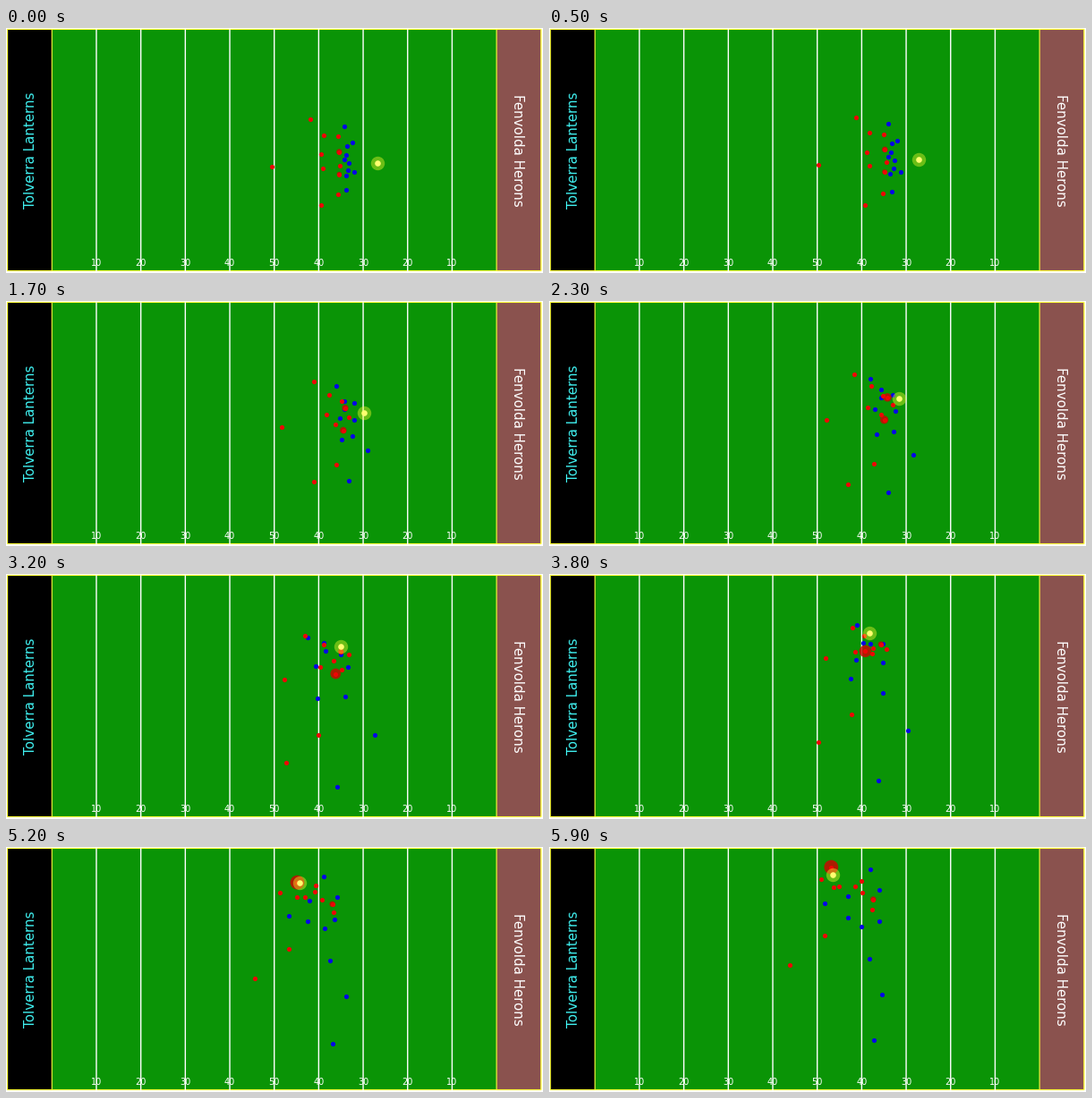
A matplotlib script for the animation above (6 s loop, 600 px wide and 274 px high).

```python
import numpy as np
import matplotlib.pyplot as plt
from matplotlib.animation import FuncAnimation
from matplotlib.patches import Rectangle

W, H, DPI = 600, 274, 100
FRAMES, INTERVAL = 60, 100
PT = 72 / DPI
GREEN, YELLOW = "#0a9406", "#ffff3c"
RED, DARK_RED, BLUE = "#ee0505", "#d40000", "#0505e6"

plt.rcParams["font.family"] = "DejaVu Sans"

# The field is cut into two phases: the rush, then the chase.
TURN, LAST = 32, FRAMES - 1
CHARGE = 6     # forward push of both teams during the rush, in pixels


def route(start, turn, end, charge=CHARGE):
    """Run from start to turn with ease-in, then on to end with ease-out."""
    start, turn, end = map(np.array, (start, turn, end))
    n = np.arange(FRAMES)[:, None]
    u = np.clip(n / TURN, 0, 1)
    v = np.clip((n - TURN) / (LAST - TURN), 0, 1)
    path = start + (turn - start) * u**1.6 + (end - turn) * v * (1.35 - 0.35 * v)
    push = charge * np.sin(np.pi * u) * [1, 0]
    return path + push + [0.3, -0.5]


def team(*routes):
    """Positions with shape (frame, player, 2)."""
    return np.stack([route(*r) for r in routes], axis=1)


ball = team(((414.5, 151), (373.5, 81), (316.5, 31), 0))

tackler = (372, 164), (368, 112), (315, 23)
helper = (372, 139), (374, 87), (362, 59)
red = team(
    tackler,
    helper,
    ((340, 102), (334, 69), (349, 38)),
    ((297, 155), (311, 118), (304, 36)),
    ((352, 198), (313, 211), (269, 132)),
    ((371, 186), (349, 180), (308, 99)),
    ((355, 120), (355, 79), (342, 44)),
    ((371, 121), (366, 97), (350, 51)),
    ((352, 141), (351, 104), (318, 45)),
    ((354, 157), (375, 107), (324, 44)),
    ((373, 154), (383, 90), (361, 70)),
)
blue = team(
    ((380, 181), (370, 238), (363, 216)),
    ((389, 161), (412, 180), (372, 165)),
    ((378, 110), (337, 71), (359, 25)),
    ((387, 128), (374, 90), (369, 48)),
    ((381, 132), (355, 77), (369, 83)),
    ((380, 142), (357, 86), (334, 55)),
    ((378, 147), (346, 103), (334, 79)),
    ((383, 151), (382, 104), (349, 89)),
    ((382, 159), (379, 137), (358, 125)),
    ((380, 165), (348, 139), (308, 63)),
)


def area(radius):
    return (2 * np.asarray(radius) * PT) ** 2


def halo_areas(n):
    """The tackler's halo swells as he closes in; the helper's flares once."""
    swell = np.interp(n, [10, 46], [2.7, 7.9])
    flare = 3.2 + 1.5 * np.exp(-(((n - 23) / 5) ** 2))
    return area([swell, flare])


fig = plt.figure(figsize=(W / DPI, H / DPI), dpi=DPI, facecolor="white")
ax = fig.add_axes([0, 0, 1, 1])
ax.set_xlim(0, W)
ax.set_ylim(H, 0)
ax.axis("off")


def yard_x(yard):
    """Yards are counted from the left goal line."""
    return 51.3 + 4.968 * yard


def box(first, last, color):
    x = yard_x(first)
    ax.add_patch(Rectangle((x, 1.5), yard_x(last) - x, 270, facecolor=color,
                           edgecolor=YELLOW, linewidth=1.1 * PT,
                           snap=False, zorder=1))


box(-10, 110, GREEN)
box(-10, 0, "black")
box(100, 110, "#8a524e")

for yard in range(10, 100, 10):
    x = yard_x(yard)
    ax.plot([x, x], [2, 271.5], color="white", lw=1.4 * PT, snap=False,
            zorder=2)
    ax.text(x, 262.8, str(min(yard, 100 - yard)), color="white",
            fontsize=9.8 * PT, ha="center", va="center", zorder=3)

for x, name, color, angle in [(28, "Tolverra Lanterns", "#40f0f0", 90),
                              (571.5, "Fenvolda Herons", "white", 270)]:
    ax.text(x, 136.5, name, color=color, fontsize=15 * PT, rotation=angle,
            ha="center", va="center", zorder=3)


def dots(points, radius, color, z, alpha=1):
    return ax.scatter(points[:, 0], points[:, 1], s=area(radius), c=color,
                      alpha=alpha, linewidths=0, zorder=z)


blues = dots(blue[0], 2.6, BLUE, 4)
halos = dots(red[0, :2], 2.7, DARK_RED, 5, 0.8)
reds = dots(red[0], 2.6, RED, 6)
glow = dots(ball[0], 7.7, "#ffff30", 7, 0.4)
core = dots(ball[0], 3.3, "#ffff70", 8)


def update(n):
    halos.set_offsets(red[n, :2])
    halos.set_sizes(halo_areas(n))
    reds.set_offsets(red[n])
    blues.set_offsets(blue[n])
    glow.set_offsets(ball[n])
    core.set_offsets(ball[n])
    return blues, halos, reds, glow, core


anim = FuncAnimation(fig, update, frames=FRAMES, interval=INTERVAL,
                     repeat=True, repeat_delay=0, blit=False)
plt.show()
```
